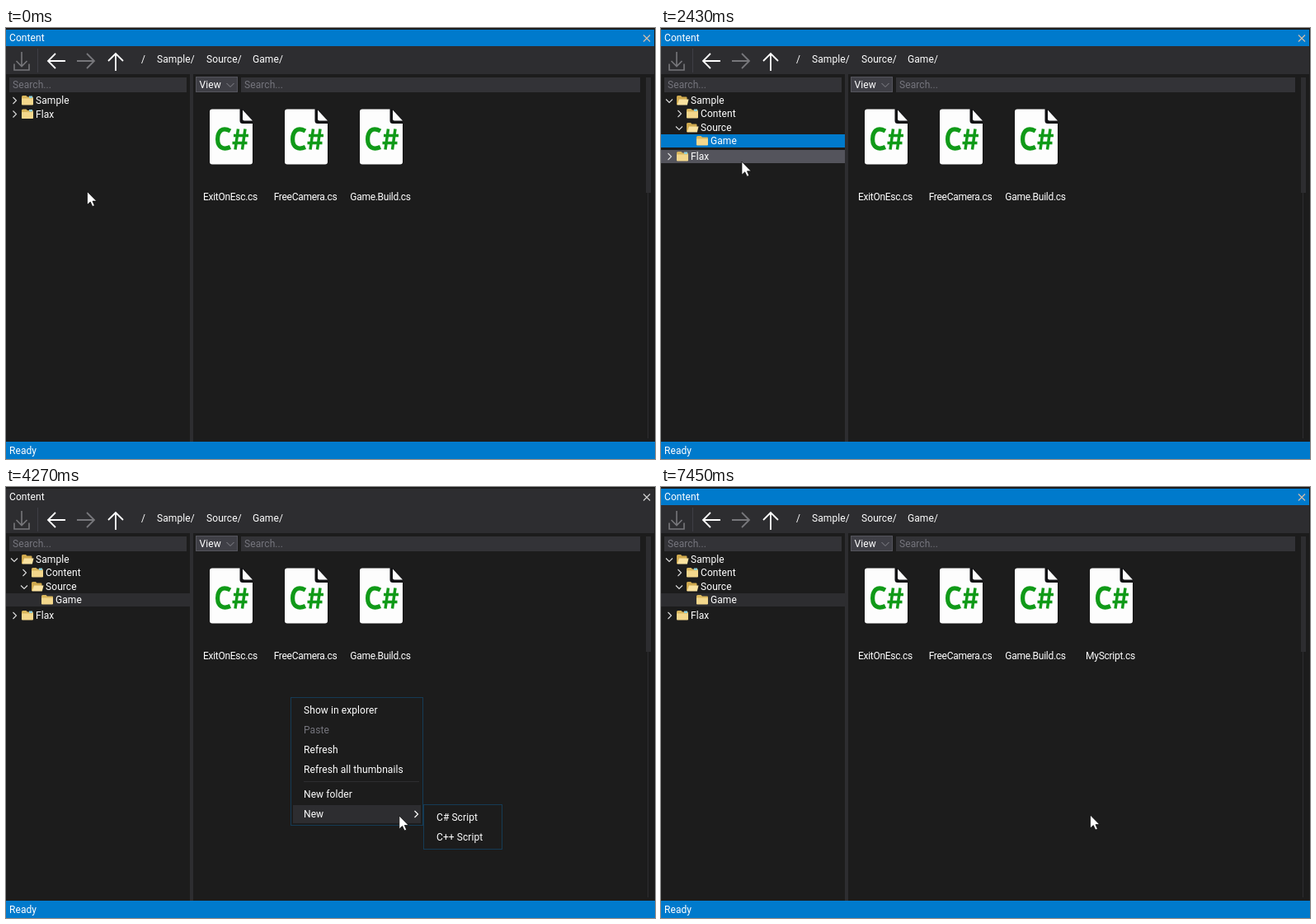
An HTML page that plays this animation: 787 px wide and 523 px high, repeating every 8.61 s.

```html
<!DOCTYPE html>
<html lang="en">
<head>
<meta charset="utf-8">
<title>Content window</title>
<style>
html, body { margin: 0; width: 100%; height: 100%; overflow: hidden; background: #1c1c1c; }
svg { display: block; width: 787px; height: 523px; }
text { font: 12px Roboto, "Noto Sans", sans-serif; letter-spacing: .08px; fill: #fff; white-space: pre; }
.file { letter-spacing: -.28px; text-anchor: middle; }
.dim { fill: #75757d; }
.line { fill: none; stroke: #fff; }
</style>
</head>
<body>
<svg id="stage" viewBox="0 0 787 523" xmlns="http://www.w3.org/2000/svg">
  <defs>
    <clipPath id="underSample"><rect y="96" width="223" height="300"/></clipPath>
    <clipPath id="underSource"><rect y="129" width="223" height="300"/></clipPath>
    <filter id="soft" x="-20%" y="-20%" width="140%" height="140%"><feGaussianBlur stdDeviation="1.6"/></filter>
    <g id="page">
      <path d="M3 0H35V18H52V64Q52 67 49 67H3Q0 67 0 64V3Q0 0 3 0Z" fill="none" stroke="#000" stroke-opacity=".4" stroke-width="1.4"/>
      <path d="M36 0H40L52 13V18H36Z" fill="#111114"/>
      <path d="M3 0H36.500V14Q36.500 17.500 40 17.500H52V64Q52 67 49 67H3Q0 67 0 64V3Q0 0 3 0Z" fill="#fdfdfd"/>
      <path d="M40 1L52 14H42Q40 14 40 12Z" fill="#fdfdfd"/>
    </g>
    <g id="sharp" class="line" style="stroke:#109a18">
      <path d="M25 26.500C15 21 9.600 27 9.600 36.500C9.600 46 16 50 25 46" stroke-width="5.200"/>
      <path d="M34.500 24L31 49M43 24L39.500 49M29 32H47M27.500 41H45.500" stroke-width="3.500"/>
    </g>
    <g id="folder">
      <path d="M0 2.500Q0 1 1.500 1H5.500L7 2.500H13Q14 2.500 14 3.500V12H0Z" fill="#d9b65c"/>
      <path d="M0 4.500H14V11.500Q14 12.500 13 12.500H1Q0 12.500 0 11.500Z" fill="#f3d78c"/>
    </g>
    <g id="badge"><rect x="9" y="1.500" width="4" height="2.500" fill="#8fd0dc"/></g>
    <g id="folderOpen">
      <path d="M0 2.500Q0 1 1.500 1H5L6.500 2.500H11.500Q12.500 2.500 12.500 3.500V12H0Z" fill="#cfa94e"/>
      <path d="M3 5.500H14.600L12.800 12.500H.5Z" fill="#f9e2a0"/>
    </g>
  </defs>
</svg>
<script>
const NS = "http://www.w3.org/2000/svg";
const stage = document.getElementById("stage");
const LOOP = 8610;
const BLUE = "#007acc", LIGHT = "#2d2d30", HOVER = "#54545c", FIELD = "#333337", BASE = "#1c1c1c";

function add(parent, tag, attrs = {}, content) {
  const el = document.createElementNS(NS, tag);
  for (const k in attrs) el.setAttribute(k, attrs[k]);
  if (content !== undefined) el.textContent = content;
  parent.appendChild(el);
  return el;
}
const group = (parent, attrs) => add(parent, "g", attrs);
const rect = (parent, x, y, width, height, fill, more) => add(parent, "rect", { x, y, width, height, fill, ...more });
const frame = (parent, x, y, w, h, fill, stroke) => rect(parent, x + .5, y + .5, w - 1, h - 1, fill, { stroke });
const label = (parent, x, mid, str, cls = "") => add(parent, "text", { x, y: mid + 4, class: cls }, str);
const line = (parent, d, stroke = "#fff", w = 1) => add(parent, "path", { d, class: "line", "stroke-width": w, style: `stroke:${stroke}` });
const use = (parent, id, x, y) => add(parent, "use", { href: "#" + id, x, y });
const show = (el, on) => el.setAttribute("visibility", on ? "inherit" : "hidden");
const move = (el, x, y) => el.setAttribute("transform", `translate(${x} ${y})`);

// Window chrome
rect(stage, 0, 0, 787, 523, BASE);
const titleBar = rect(stage, 0, 2, 786, 20, BLUE);
label(stage, 4, 12, "Content");
const closeMark = line(stage, "M773 8.500L781 16.500M781 8.500L773 16.500", "#ccc", 1.2);
rect(stage, 0, 22, 786, 34, LIGHT);
line(stage, "M19 29V46M12.500 40L19 46.500L25.500 40M10 43.500V51H28V43.500", "#77777b", 1.6);
rect(stage, 38, 25, 1, 29, "#3f3f46");
line(stage, "M72 40H51M60 31L51 40L60 49", "#fff", 1.8);
line(stage, "M86 40H107M98 31L107 40L98 49", "#77777b", 1.8);
line(stage, "M133 52V31M124 40L133 31L142 40", "#fff", 1.8);
[[164, "/"], [183, "Sample/"], [243, "Source/"], [299, "Game/"]].forEach(([x, s]) => label(stage, x, 38, s));

rect(stage, 223, 56, 4, 446, LIGHT);
rect(stage, 4, 60, 215, 18, FIELD);
label(stage, 8, 69, "Search...", "dim");
frame(stage, 230, 59, 51, 19, "#3f3f46", HOVER);
label(stage, 234.500, 69, "View");
line(stage, "M267.500 67L272 71.500L276.500 67", "#85858c");
rect(stage, 285, 60, 484, 18, FIELD);
label(stage, 289, 69, "Search...", "dim");
rect(stage, 778, 60, 1, 438, LIGHT);
rect(stage, 776, 60, 6, 140, LIGHT);
rect(stage, 0, 502, 787, 21, BLUE);
label(stage, 4, 513, "Ready");

// Folder tree: each node is drawn around its own row, top at 0
function node(parent, level, name, { arrow = true, badge = false } = {}) {
  const g = group(parent), x = level * 12;
  const back = rect(g, 0, 0, 223, 16, HOVER);
  const closed = group(g), open = group(g);
  if (arrow) {
    line(closed, `M${x + 8.500} 4L${x + 12.500} 8L${x + 8.500} 12`, "#ddd", 1.1);
    line(open, `M${x + 6} 6.500L${x + 10} 10.500L${x + 14} 6.500`, "#ddd", 1.1);
  }
  use(closed, "folder", x + 19, 1);
  if (badge) use(closed, "badge", x + 19, 1);
  use(open, "folderOpen", x + 19, 1);
  label(g, x + 36, 8, name);
  show(open, false);
  return {
    place(y) { move(g, 0, y); this.y = y; },
    paint(color) { show(back, !!color); if (color) back.setAttribute("fill", color); },
    expand(on) { show(open, on); show(closed, !on); }
  };
}
const tree = group(stage);
const flax = node(tree, 0, "Flax", { badge: true });
const sampleKids = group(tree, { "clip-path": "url(#underSample)" });
const sourceKids = group(sampleKids, { "clip-path": "url(#underSource)" });
const game = node(sourceKids, 2, "Game", { arrow: false });
const source = node(sampleKids, 1, "Source");
const content = node(sampleKids, 1, "Content", { badge: true });
const sample = node(tree, 0, "Sample", { badge: true });

// Files
const PAGE_Y = 98.5;
function file(parent, i, name) {
  const x = 247 + i * 91;
  use(parent, "page", x, PAGE_Y);
  const mark = use(parent, "sharp", x, PAGE_Y);
  label(parent, x + 25, 205, name, "file");
  return mark;
}
["ExitOnEsc.cs", "FreeCamera.cs", "Game.Build.cs"].forEach((name, i) => file(stage, i, name));
const newFile = group(stage);
const newMark = file(newFile, 3, "MyScript.cs");

// Tile with the rename box
const editor = group(stage);
rect(editor, 500, 86, 91, 92, BLUE);
rect(editor, 504, 90, 83, 85, "#00253f", { filter: "url(#soft)", opacity: .75 });
rect(editor, 504, 90, 82, 82, "#686868");
use(editor, "page", 520, PAGE_Y);
frame(editor, 500, 177, 91, 53, FIELD, BLUE);
const selection = rect(editor, 504, 178, 41, 14, BLUE);
const typed = label(editor, 504, 185, "Script 0");
const caret = rect(editor, 544, 179, 1, 13, "#fff");

// Context menus
function menu(x, y, w, h, rows) {
  const g = group(stage);
  frame(g, x, y, w, h, BASE, "#153b55");
  const items = rows.map(([mid, name, off]) => {
    const back = rect(g, x + 3, mid - 11, w - 6, 22, LIGHT);
    label(g, x + 16, mid, name, off ? "dim" : "");
    return { top: mid - 11, bottom: mid + 11, light: on => show(back, on && !off) };
  });
  return { g, items, show: on => show(g, on) };
}
const mainMenu = menu(345, 255, 161, 156, [
  [271, "Show in explorer"], [295, "Paste", true], [319, "Refresh"],
  [343, "Refresh all thumbnails"], [373, "New folder"], [397, "New"]
]);
rect(mainMenu.g, 361, 357, 140, 1, LIGHT);
line(mainMenu.g, "M495.500 393L499.500 397L495.500 401", "#fff", 1.2);
const subMenu = menu(506, 385, 96, 55, [[401, "C# Script"], [425, "C++ Script"]]);

const pointer = add(stage, "path", {
  d: "M0 0V16L3.800 12.600L6.300 18L8.900 17L6.500 11.600H11.300Z",
  fill: "#fff", stroke: "#000", "stroke-width": .7
});

// Timing
const clamp = v => Math.min(1, Math.max(0, v));
const ease = v => v * v * (3 - 2 * v);
const span = (t, start, length) => ease(clamp((t - start) / length));

// Pointer stops: time, x, y
const stops = [
  [140, 98.500, 198.500], [720, 8.500, 89.500], [1040, 8.500, 89.500], [1340, 24.500, 118.500],
  [1440, 24.500, 118.500], [1480, 24.500, 119.500], [1740, 24.500, 119.500], [2050, 42, 141],
  [2280, 42, 141], [2830, 345, 255.500], [2970, 345, 255.500], [3490, 388.500, 364],
  [3830, 389.500, 391.500], [3880, 389.500, 393.500], [4010, 389.500, 393.500], [4410, 510.500, 401],
  [4600, 510.500, 401], [4730, 522.500, 401.500], [5040, 522.500, 401.500], [5410, 520.500, 398]
];
function pointerAt(t) {
  const i = stops.findIndex(s => s[0] > t);
  if (i === 0) return stops[0].slice(1);
  if (i < 0) return stops[stops.length - 1].slice(1);
  const [t0, x0, y0] = stops[i - 1], [t1, x1, y1] = stops[i];
  const k = span(t, t0, t1 - t0);
  return [x0 + (x1 - x0) * k, y0 + (y1 - y0) * k];
}

const NAME = "MyScript";
const keys = [5750, 6030, 6270, 6510, 6650, 6790, 6930, 7070];
const MENU = 2970, CREATE = 4920, DONE = 7260;

function drawTree(t, x, y, focused) {
  const a = span(t, 870, 380), b = span(t, 1660, 330);
  const shift = Math.round(-34 * (1 - a));
  sample.place(80);
  content.place(96 + shift);
  source.place(113 + shift);
  game.place(129 + Math.round(-18 * (1 - b)));
  flax.place(96.5 + Math.round(34 * a + 18 * b) - a / 2);
  sample.expand(t >= 870);
  source.expand(t >= 1660);
  show(sampleKids, a > 0);
  show(sourceKids, b > 0);

  const rows = [sample, flax];
  if (a > 0) rows.push(source, content);
  const over = x < 223 && rows.find(n => y >= n.y && y < n.y + 16);
  [sample, content, source, flax].forEach(n => n.paint(n === over ? HOVER : null));
  game.paint(focused ? BLUE : LIGHT);
}

function drawMenus(t, x, y) {
  const open = t >= MENU && t < CREATE, nested = open && t >= 3780;
  mainMenu.show(open);
  subMenu.show(nested);
  mainMenu.items.forEach((item, i) => {
    const over = x >= 348 && x < 503 && y >= item.top && y < item.bottom;
    item.light(open && (nested ? i === 5 : over));
  });
  subMenu.items.forEach((item, i) => item.light(nested && i === 0 && x > 511));
}

function drawEditor(t) {
  const on = t >= CREATE && t < DONE;
  show(editor, on);
  show(newFile, t >= DONE);
  show(newMark, t >= 7400);
  if (!on) return;
  const count = keys.filter(k => t >= k).length;
  typed.textContent = count ? NAME.slice(0, count) : "Script 0";
  const pulse = Math.cos((t - (count ? keys[count - 1] : CREATE)) * .006) / 2;
  selection.setAttribute("opacity", Math.min(1, pulse + 1.3) ** 2);
  show(selection, !count);
  caret.setAttribute("x", Math.floor(503 + typed.getComputedTextLength()));
  caret.setAttribute("opacity", clamp(pulse + .7) ** 6);
}

function draw(t) {
  const [x, y] = pointerAt(t);
  const active = t < MENU || t >= DONE;
  titleBar.setAttribute("fill", active ? BLUE : LIGHT);
  closeMark.style.stroke = active ? "#d3c0ac" : "#d0d0d0";
  drawTree(t, x, y, t < MENU);
  drawMenus(t, x, y);
  drawEditor(t);
  move(pointer, x, y);
}

const start = performance.now();
function tick() {
  draw((performance.now() - start) % LOOP);
  requestAnimationFrame(tick);
}
tick();
</script>
</body>
</html>
```
